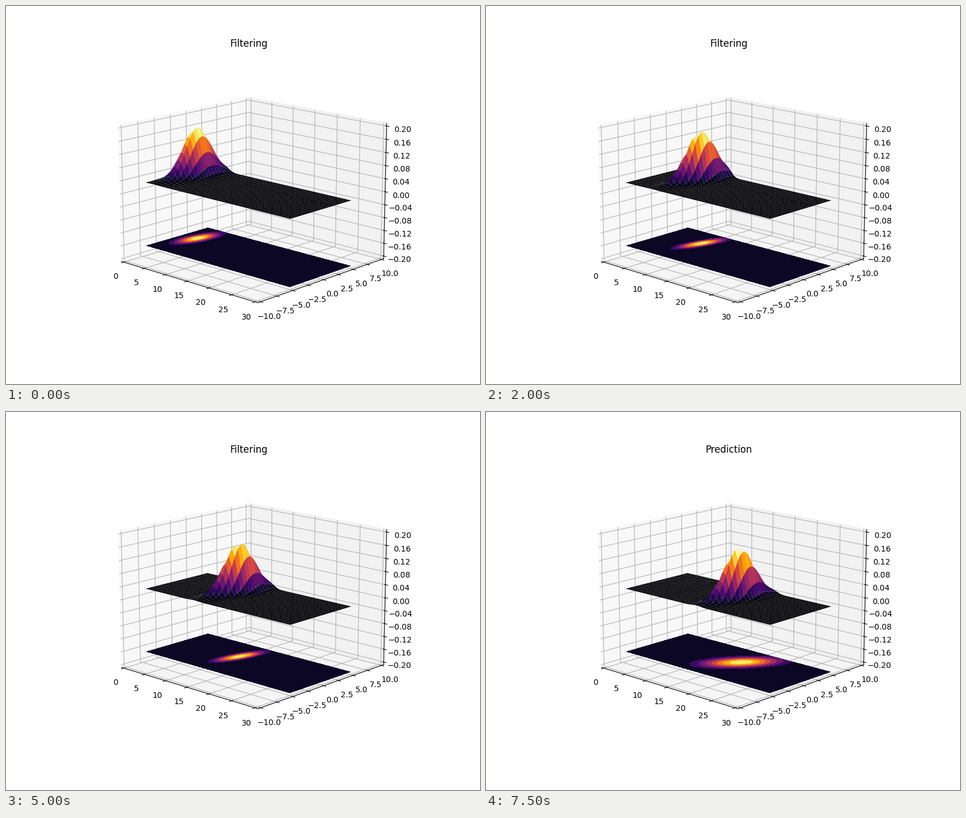
A matplotlib script for the animation above (8 s loop, 837 px wide and 669 px high).

```python
import numpy as np
import matplotlib.pyplot as plt
from matplotlib.animation import FuncAnimation

STEPS = 8
PEAK = 0.155
FLOOR = -0.2
DRIFT = np.array([1.6, 0.0])

# Filtered mean at each step of the tracker
MEANS = np.array([
    (0.2, 1.1), (2.2, 1.05), (5.45, 1.5), (6.95, 0.65), (9.64, 1.09),
    (10.6, 0.9), (12.6, 1.15), (14.0, 0.95), (15.7, 0.5),
])
COV_START = np.array([[1.45, 0.75], [0.75, 3.7]])
COV_FILTER = np.array([[1.3, 1.3], [1.3, 3.85]])
COV_PREDICT = np.array([[9.5, 5.1], [5.1, 5.6]])


def grid(nx, ny):
    return np.meshgrid(np.linspace(-3, 30, nx), np.linspace(-5, 5, ny))


def bell(x, y, mean, cov):
    d = np.stack([x - mean[0], y - mean[1]], axis=-1)
    q = np.einsum("...i,ij,...j->...", d, np.linalg.inv(cov), d)
    return PEAK * np.exp(-q / 2)


def padded(lo, hi):
    pad = (hi - lo) / 48
    return lo - pad, hi + pad


# The small surplus keeps the pixel size from rounding down
fig = plt.figure(figsize=(8.3701, 6.6901), dpi=100)
ax = fig.add_subplot(projection="3d")
ax.view_init(elev=15, azim=-47)
ax.set_xlim(*padded(0, 30))
ax.set_ylim(*padded(-10, 10))
ax.set_zlim(*padded(-0.2, 0.2))
ax.set_xticks(np.arange(0, 31, 5))
ax.set_yticks(np.arange(-10, 10.1, 2.5))
ax.set_zticks(np.arange(-5, 6) * 0.04)
title = ax.set_title("Filtering")

SX, SY = grid(51, 21)
CX, CY = grid(166, 101)
drawn = []


def update(i):
    while drawn:
        drawn.pop().remove()

    step = (i + 1) // 2
    predicting = i % 2 == 1
    mean = MEANS[step]
    cov = COV_FILTER if step else COV_START
    surface = bell(SX, SY, mean, cov)
    drawn.append(ax.plot_surface(SX, SY, surface, rstride=1, cstride=1,
                                 cmap="inferno", antialiased=True))

    if predicting:
        mean, cov = MEANS[step - 1] + DRIFT, COV_PREDICT
    shadow = bell(CX, CY, mean, cov)
    drawn.append(ax.contourf(CX, CY, shadow, zdir="z", offset=FLOOR,
                             levels=np.arange(9) * 0.02, cmap="inferno"))

    title.set_text("Prediction" if predicting else "Filtering")
    return [*drawn, title]


anim = FuncAnimation(fig, update, frames=2 * STEPS, interval=500,
                     repeat=True, repeat_delay=0, blit=False)
plt.show()
```
